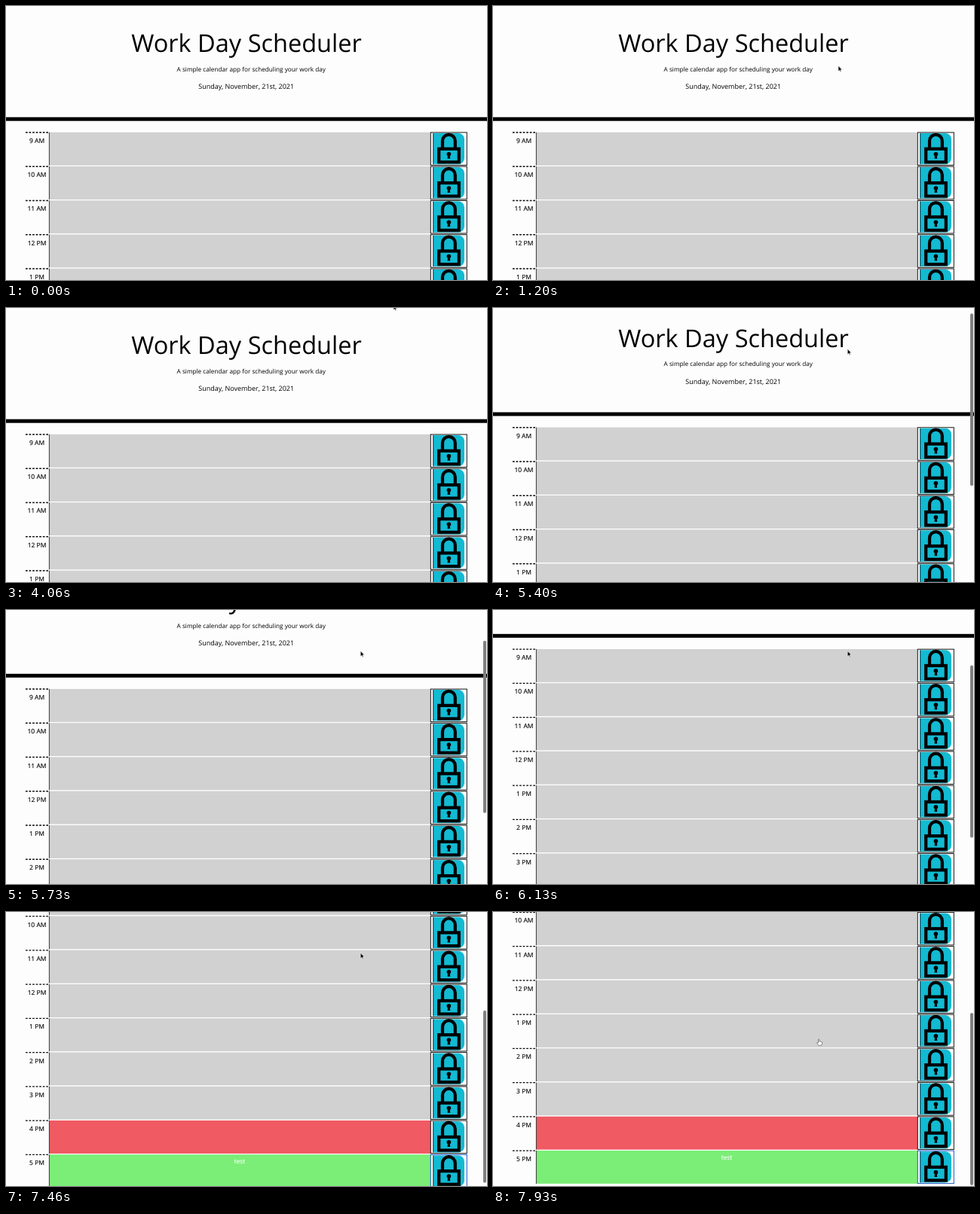
Write an HTML page that moves like this. It is 638 px wide and 364 px high and loops after 8 s.

```html
<!DOCTYPE html>
<html lang="en">
<head>
<meta charset="utf-8">
<title>Work Day Scheduler</title>
<style>
  html, body { margin: 0; width: 100%; height: 100%; overflow: hidden; background: #fdfdfd; }
  svg { display: block; width: 638px; height: 364px; }
  text { font: 8.2px "Open Sans", sans-serif; text-anchor: middle; text-rendering: geometricPrecision; }
  .title { font-size: 32.5px; }
  .date { font-size: 9px; }
  .hour { font-size: 8.5px; stroke: #000; stroke-width: .12px; }
  .note { fill: #fff; stroke: #fff; stroke-width: .12px; }
</style>
</head>
<body>
<svg viewBox="0 0 638 364">
  <defs>
    <g id="save">
      <path d="M566.5 1.2H600a8 8 0 0 1 8 8V34.5a8 8 0 0 1-8 8H566.5Z" fill="#12bad2"/>
      <path d="M566.7 1.2V42.5" stroke="#123" stroke-width=".9"/>
      <g fill="none" stroke="#000" stroke-width="4.2">
        <path d="M579 21V11.4a8.4 8.4 0 0 1 16.8 0V21"/>
        <rect x="574.2" y="22" width="26.6" height="17.6"/>
      </g>
      <circle cx="587.4" cy="28.9" r="2.8"/>
      <path d="M586.2 29h2.4l.6 6h-3.6Z"/>
    </g>
  </defs>
  <g id="page">
    <text class="title" x="319" y="61">Work Day Scheduler</text>
    <text x="325.3" y="86.5">A simple calendar app for scheduling your work day</text>
    <text class="date" x="318.7" y="110.3">Sunday, November, 21st, 2021</text>
    <rect y="147.7" width="638" height="5"/>
    <g id="rows"></g>
  </g>
  <rect id="thumb" x="633" width="4" height="229" rx="2" fill="#7f7f7f"/>
  <g id="cursor" stroke-linejoin="round">
    <path id="arrow" stroke="#fff" stroke-width=".6" d="M0 0V7.2L1.7 5.7 2.7 8 3.9 7.5 2.9 5.2H5.2Z"/>
    <path id="hand" fill="#fff" stroke="#444" stroke-width=".6"
      d="M-1 4V0Q-.4-1.2 .3 0V2.6L3.4 3.3Q4.4 3.6 4.2 4.8L3.4 8H-.6L-3 4.8Q-3.2 3.6-1 4.6Z"/>
  </g>
</svg>
<script>
const FPS = 15, LOOP = 8000, ROW_TOP = 167.8, ROW_PITCH = 45.25, MAX_SCROLL = 213;
const $ = id => document.getElementById(id);

function rowMarkup(i) {
  const hour = 9 + i, present = hour === 16, future = hour > 16;
  const label = `${(hour - 1) % 12 + 1} ${hour < 12 ? 'AM' : 'PM'}`;
  const fill = future ? '#7bee77' : present ? '#f05a62' : '#d1d1d1';
  return `<g transform="translate(0 ${ROW_TOP + i * ROW_PITCH})">
    <path d="M26 .2H56" stroke="#000" stroke-width="1.4" stroke-dasharray="2.7 1.85"/>
    <text class="hour" x="41" y="14.2">${label}</text>
    <rect x="57" y="-1" width="506" height="46" fill="#fff"/>
    <rect x="57.5" width="505.5" height="44" fill="${fill}"/>
    <path d="M57.4 0V44" stroke="#222" stroke-width=".9"/>
    ${future ? '<text class="note" x="310" y="12.2">test</text>' : ''}
    <rect x="563.3" y=".2" width="48" height="43.5" fill="#fff" stroke="${future ? '#1b55c8' : '#111'}"/>
    <use href="#save"/>
  </g>`;
}
$('rows').innerHTML = Array.from({ length: 9 }, (_, i) => rowMarkup(i)).join('');

const clamp = (v, min, max) => Math.min(max, Math.max(min, v));
const easeOut = p => 1 - (1 - p) ** 2;

// Critically damped scroll: quick start, long tail. Times are in frames.
function fling(frame, start, length, distance, rate) {
  const u = rate * clamp(frame - start, 0, length);
  return distance * (1 - (1 + u) * Math.exp(-u));
}

const scrollAt = frame => Math.min(MAX_SCROLL,
  fling(frame, 79, 21, 164, 0.19) + fling(frame, 102, 13, 68, 0.35));

const cursorStart = { x: 338, y: 22 };
const cursorMoves = [
  { at: 0, length: 7, x: 407, y: 74 },
  { at: 14, length: 4, x: 458, y: 79.5 },
  { at: 57, length: 4, x: 514, y: -4.5 },
  { at: 72, length: 4, x: 470.2, y: 54.5 },
  { at: 115, length: 4, x: 432.5, y: 169.2 },
];

const cursorAt = frame => cursorMoves.reduce((pos, { at, length, x, y }) => {
  const p = easeOut(clamp((frame - at) / length, 0, 1));
  return { x: pos.x + (x - pos.x) * p, y: pos.y + (y - pos.y) * p };
}, cursorStart);

const show = (id, on) => $(id).setAttribute('display', on ? 'inline' : 'none');
const move = (id, x, y) => $(id).setAttribute('transform', `translate(${x} ${y})`);

function draw() {
  // Frame starts fall on whole hundredths of a second.
  const centis = Math.floor(performance.now() % LOOP / 10);
  const frame = Math.ceil((centis + 1) * FPS / 100) - 1;

  const scroll = scrollAt(frame);
  move('page', 0, -scroll);
  move('thumb', 0, 1.5 + scroll * 0.622);
  show('thumb', frame >= 79);

  const { x, y } = cursorAt(frame);
  move('cursor', x, y);
  show('cursor', frame >= 1 && (frame < 47 || frame >= 58));
  show('arrow', frame < 116);
  show('hand', frame >= 116);
  requestAnimationFrame(draw);
}
draw();
</script>
</body>
</html>
```
